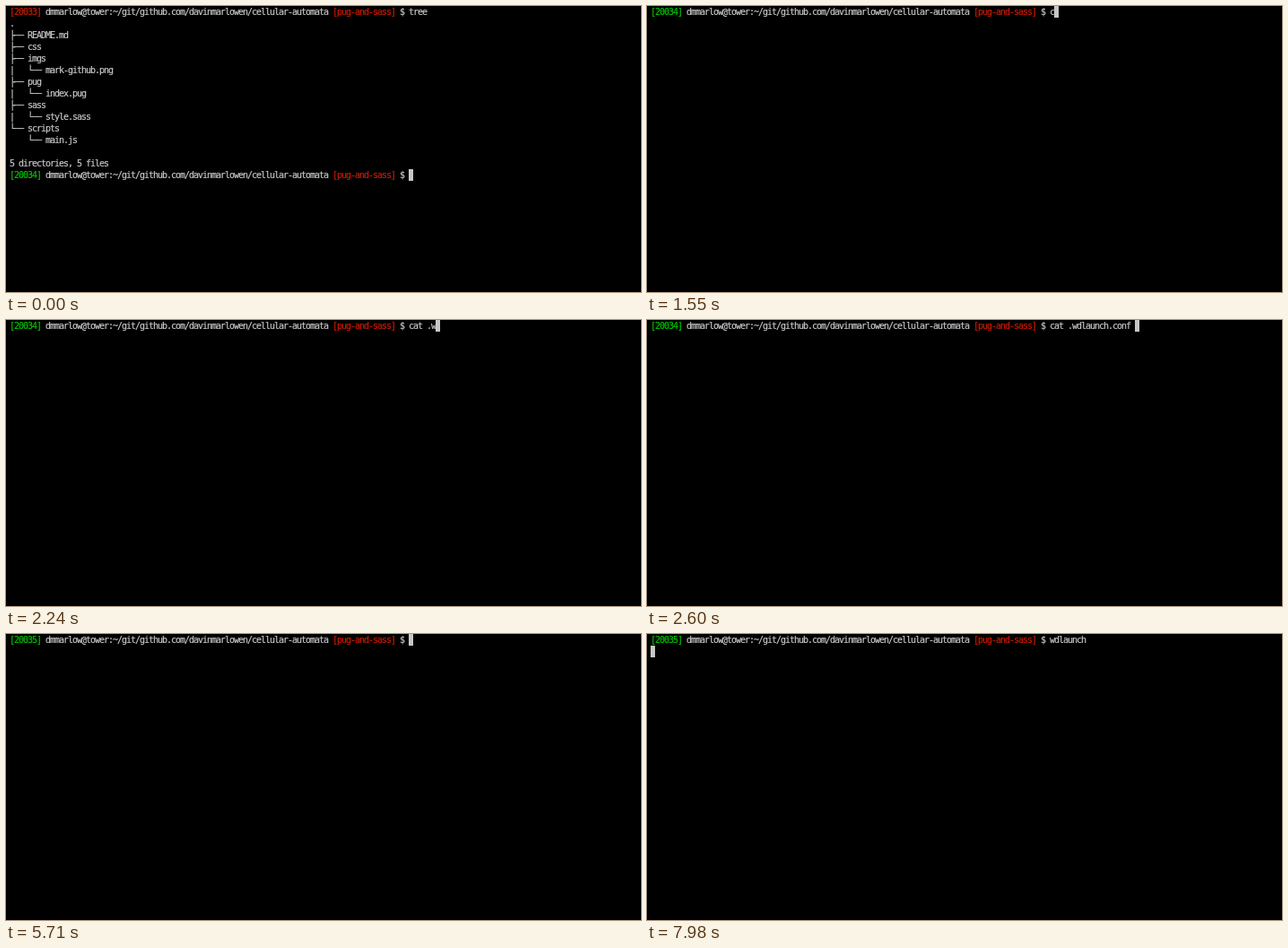
An HTML page for the animation above (8000 ms loop, 708x319 px).

```html
<!DOCTYPE html>
<html lang="en">
<head>
<meta charset="utf-8">
<title>Terminal</title>
<style>
  html, body { margin: 0; width: 100%; height: 100%; overflow: hidden; background: #000; }
  pre {
    margin: 0; padding-left: 4px; color: #c7c7c7;
    font: 10px/13px "DejaVu Sans Mono", monospace;
    letter-spacing: calc(5px - 1ch); /* 5px terminal cells */
    font-variant-ligatures: none;
    -webkit-text-stroke: 0.2px;
  }
  .red { color: #c91b00; }
  .green { color: #00c200; }
  .cursor { display: inline-block; width: 5px; height: 13px; vertical-align: top; background: #c7c7c7; }
</style>
</head>
<body>
<pre id="term"></pre>
<script>
const LOOP = 8000;
const term = document.getElementById('term');
const span = (cls, text = '') => `<span class="${cls}">${text}</span>`;
const prompt = (n, color = 'green') =>
  `${span(color, `[${n}]`)} dmmarlow@tower:~/git/github.com/davinmarlowen/cellular-automata ${span('red', '[pug-and-sass]')} $ `;

const tree = `.
├── README.md
├── css
├── imgs
|   └── mark-github.png
├── pug
|   └── index.pug
├── sass
|   └── style.sass
└── scripts
    └── main.js

5 directories, 5 files
`;
const config = `# pug config
PUG_FROM_DIR="pug"
PUG_TO_DIR="."

# sass config
SASS_FROM_DIR="sass"
SASS_TO_DIR="css"
`;

const cat = 'cat .wdlaunch.conf ';
const launch = 'wdlaunch ';
const first = prompt(20034), second = prompt(20035);
const typed = (line, command, keys) =>
  keys.map(([time, count]) => [time, line + command.slice(0, count)]);

// [start time in ms, screen contents before the cursor]
const steps = [
  [0, prompt(20033, 'red') + 'tree\n' + tree + first],
  ...typed(first, cat, [[1070, 0], [1550, 1], [1700, 2], [1790, 3], [1880, 4],
    [2090, 5], [2240, 6], [2450, 7], [2600, cat.length]]),
  [3220, first + cat + '\n' + config + second],
  ...typed(second, launch, [[5710, 0], [6040, 1], [6210, 2], [6930, 3], [7170, launch.length]]),
  [7980, second + launch + '\n'],
];

let shown;
function draw() {
  const t = performance.now() % LOOP;
  const step = steps.findLast(([time]) => time <= t);
  if (step !== shown) {
    shown = step;
    term.innerHTML = step[1] + span('cursor');
  }
  requestAnimationFrame(draw);
}
draw();
</script>
</body>
</html>
```
